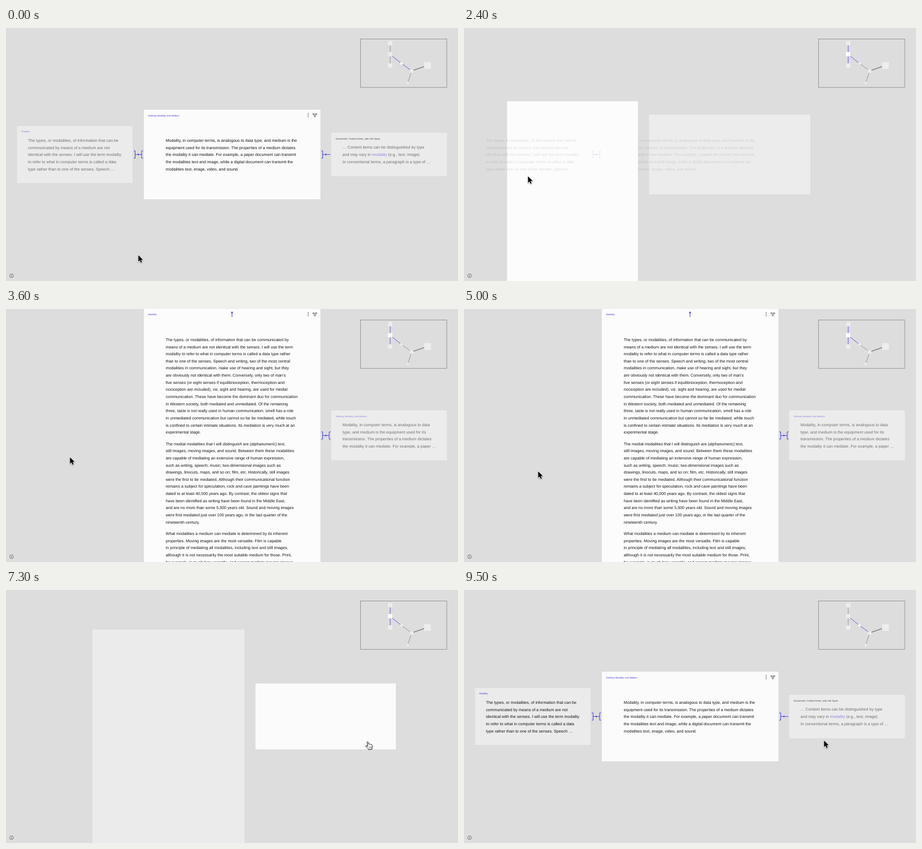
An HTML page with a canvas that plays this animation: 800x449 px, repeating every 9600 ms.

```html
<!DOCTYPE html>
<html lang="en">
<head>
<meta charset="utf-8">
<title>Linked cards</title>
<style>
html, body { margin: 0; width: 100%; height: 100%; overflow: hidden; background: #ddd; }
canvas { display: block; width: 800px; height: 449px; }
</style>
</head>
<body>
<canvas id="stage"></canvas>
<script>
const LOOP = 9600;
const canvas = document.getElementById('stage');
const ctx = canvas.getContext('2d');
const dpr = window.devicePixelRatio || 1;
canvas.width = 800 * dpr;
canvas.height = 449 * dpr;

const BLUE = '#463cdc', INK = '#141414', DIM = 0.57;
const LEADING = 12.64;
const OPEN_AT = 1983, CLOSE_AT = 6812, MOVE = 1050;

const shortText = [
  'The types, or modalities, of information that can be',
  'communicated by means of a medium are not',
  'identical with the senses. I will use the term modality',
  'to refer to what in computer terms is called a data',
  'type rather than to one of the senses. Speech …'];
const centerText = [
  'Modality, in computer terms, is analogous to data type, and medium is the',
  'equipment used for its transmission. The properties of a medium dictates',
  'the modality it can mediate. For example, a paper document can transmit',
  'the modalities text and image, while a digital document can transmit the',
  'modalities text, image, video, and sound.'];
const sideText = [
  'Modality, in computer terms, is analogous to data',
  'type, and medium is the equipment used for its',
  'transmission. The properties of a medium dictates',
  'the modality it can mediate. For example, a paper …'];
const article = [
  ['The types, or modalities, of information that can be communicated by',
   'means of a medium are not identical with the senses. I will use the term',
   'modality to refer to what in computer terms is called a data type rather',
   'than to one of the senses. Speech and writing, two of the most central',
   'modalities in communication, make use of hearing and sight, but they',
   'are obviously not identical with them. Conversely, only two of man’s',
   'five senses (or eight senses if equilibrioception, thermoception and',
   'nociception are included), viz. sight and hearing, are used for medial',
   'communication. These have become the dominant duo for communication',
   'in Western society, both mediated and unmediated. Of the remaining',
   'three, taste is not really used in human communication, smell has a role',
   'in unmediated communication but cannot so far be mediated, while touch',
   'is confined to certain intimate situations. Its mediation is very much at an',
   'experimental stage.'],
  ['The medial modalities that I will distinguish are (alphanumeric) text,',
   'still images, moving images, and sound. Between them these modalities',
   'are capable of mediating an extensive range of human expression,',
   'such as writing, speech; music; two-dimensional images such as',
   'drawings, linocuts, maps, and so on; film, etc. Historically, still images',
   'were the first to be mediated. Although their communicational function',
   'remains a subject for speculation, rock and cave paintings have been',
   'dated to at least 40,000 years ago. By contrast, the oldest signs that',
   'have been identified as writing have been found in the Middle East,',
   'and are no more than some 5,500 years old. Sound and moving images',
   'were first mediated just over 100 years ago, in the last quarter of the',
   'nineteenth century.'],
  ['What modalities a medium can mediate is determined by its inherent',
   'properties. Moving images are the most versatile. Film is capable',
   'in principle of mediating all modalities, including text and still images,',
   'although it is not necessarily the most suitable medium for those. Print,',
   'for example, is much less versatile, and cannot mediate moving images']];

const clamp = v => Math.max(0, Math.min(1, v));
const ramp = (t, from, to) => clamp((t - from) / (to - from));
const lerp = (a, b, k) => a + (b - a) * k;
const smooth = k => k * k * (3 - 2 * k);
const cubic = k => k < 0.5 ? 4 * k ** 3 : 1 - 4 * (1 - k) ** 3;

function withAlpha(alpha, draw) {
  if (alpha <= 0) return;
  ctx.save();
  ctx.globalAlpha = alpha;
  draw();
  ctx.restore();
}

function text(str, x, y, size = 7.13, color = INK) {
  ctx.font = `${size}px "Liberation Sans", Arial, sans-serif`;
  ctx.fillStyle = color;
  ctx.fillText(str, x, y);
}
const title = (str, x, y, color = BLUE) => text(str, x, y, 4.12, color);
const lines = (list, x, y) => list.forEach((s, i) => text(s, x, y + i * LEADING));

function stroke(points, color = BLUE, width = 1) {
  ctx.strokeStyle = color;
  ctx.lineWidth = width;
  ctx.beginPath();
  points.forEach(([x, y]) => ctx.lineTo(x, y));
  ctx.stroke();
}

function fillPath(points, color) {
  ctx.fillStyle = color;
  ctx.beginPath();
  points.forEach(([x, y]) => ctx.lineTo(x, y));
  ctx.closePath();
  ctx.fill();
}

function card([x, y, w, h], gray) {
  const g = Math.round(gray);
  ctx.fillStyle = `rgb(${g},${g},${g})`;
  ctx.fillRect(x, y, w, h);
}

// Left-pointing connector between two cards.
function link(x, rightBracket) {
  const end = rightBracket ? x + 11.5 : x + 13.5;
  stroke([[x - 2.5, 218], [x, 218], [x, 231], [x - 2.5, 231]]);
  if (rightBracket) stroke([[end + 2.5, 218], [end, 218], [end, 231], [end + 2.5, 231]]);
  stroke([[x, 224.5], [end, 224.5]], BLUE, 0.9);
  fillPath([[x + 3.5, 224.5], [x + 6.5, 222.7], [x + 6.5, 226.3]], BLUE);
}

function cardIcons(y) {
  ctx.fillStyle = '#333';
  [-2.8, 0, 2.8].forEach(d => {
    ctx.beginPath();
    ctx.arc(534.8, y + d, 0.75, 0, 7);
    ctx.fill();
  });
  stroke([[544.2, y - 1.7], [549, y - 1.7], [546.6, y + 2.2], [544.2, y - 1.7]], '#444', 0.6);
  [[544.2, -1.7], [549, -1.7], [546.6, 2.2]].forEach(([x, d]) => {
    ctx.beginPath();
    ctx.arc(x, y + d, 1.2, 0, 7);
    ctx.fillStyle = '#fbfbfb';
    ctx.fill();
    ctx.strokeStyle = '#333';
    ctx.lineWidth = 0.7;
    ctx.stroke();
  });
}

function minimap(articleActive) {
  const gray = '#868686', thin = 0.8;
  ctx.strokeStyle = gray;
  ctx.lineWidth = thin;
  ctx.strokeRect(627.5, 19.5, 152.6, 85.8);
  stroke([[680, 27], [680, 66]], articleActive ? BLUE : gray, thin);
  stroke([[680, 47], [700, 63]], BLUE, thin);
  stroke([[700, 63], [718, 76]], articleActive ? gray : BLUE, thin);
  stroke([[718, 76], [746, 66.5]], gray, 1.5);
  stroke([[718, 76], [711, 97.5]], gray, thin);
  const active = articleActive ? 1 : 3;
  [[680, 27, 7.5], [680, 46.5, 7.5], [680, 66.5, 7.5], [700, 63, 4],
   [718, 76.5, 6], [746, 66.5, 12], [711, 97.5, 4]].forEach(([x, y, s], i) => {
    ctx.fillStyle = i === active ? '#fff' : '#ededed';
    ctx.fillRect(x - s / 2, y - s / 2, s, s);
  });
}

function infoIcon() {
  ctx.strokeStyle = '#555';
  ctx.lineWidth = 0.7;
  ctx.beginPath();
  ctx.arc(9.8, 439.6, 3.3, 0, 7);
  ctx.stroke();
  stroke([[9.8, 439.1], [9.8, 441.6]], '#444', 0.8);
  stroke([[9.8, 437.5], [9.8, 438.4]], '#444', 0.8);
}

function arrow(x, y) {
  ctx.save();
  ctx.translate(x + 0.3, y + 0.3);
  ctx.scale(0.95, 0.95);
  ctx.beginPath();
  [[0, 0], [0, 12], [2.8, 9.4], [4.7, 13.8], [6.7, 13], [4.9, 8.7], [8.7, 8.7]]
    .forEach(([a, b]) => ctx.lineTo(a, b));
  ctx.closePath();
  ctx.strokeStyle = '#fff';
  ctx.lineWidth = 1.4;
  ctx.shadowColor = 'rgba(0,0,0,.35)';
  ctx.shadowBlur = 2;
  ctx.shadowOffsetY = 1;
  ctx.stroke();
  ctx.shadowColor = 'transparent';
  ctx.fillStyle = '#000';
  ctx.fill();
  ctx.restore();
}

function hand(x, y) {
  ctx.save();
  ctx.translate(x - 0.5, y + 2.5);
  ctx.lineJoin = 'round';
  const shape = new Path2D('M2.6 1.2C2.2-.3 4.1-.7 4.6.8L5.7 4.4C6.2 3.6 7.3 3.7 7.6 4.5' +
    'C8.2 3.8 9.2 4 9.5 4.9C10.4 4.4 11.3 5 11.5 6L11.8 8.4C11.9 10 11.3 11 11.2 13.2' +
    'L5.2 13.6C4.6 11.6 2.2 10.2.5 8.2C-.1 7 1.2 6.3 2.3 7L3.9 8.1Z');
  ctx.fillStyle = '#fff';
  ctx.fill(shape);
  ctx.strokeStyle = '#111';
  ctx.lineWidth = 1;
  ctx.stroke(shape);
  [6.5, 8.1, 9.7].forEach(a => stroke([[a, 8.6], [a + 0.2, 11]], '#111', 0.6));
  ctx.restore();
}

const pointerPath = [
  [500, 234, 403], [1400, 116, 269], [1700, 113, 263], [4050, 113, 263], [4600, 131, 288],
  [5750, 131, 288], [6300, 625, 272], [6700, 637, 267]];

function pointer(t) {
  let [, x, y] = pointerPath[0];
  for (let i = 1; i < pointerPath.length; i++) {
    const [t0] = pointerPath[i - 1], [t1, x1, y1] = pointerPath[i];
    const k = smooth(ramp(t, t0, t1));
    x = lerp(x, x1, k);
    y = lerp(y, y1, k);
  }
  const overCard = (t >= 1350 && t < 2300) || (t >= 6550 && t < 8400);
  (overCard ? hand : arrow)(x, y);
}

function render(t) {
  const back = t >= 7250;
  const open = back
    ? 1 - cubic(ramp(t, CLOSE_AT, CLOSE_AT + MOVE))
    : cubic(ramp(t, OPEN_AT, OPEN_AT + MOVE));
  const quickFade = 1 - ramp(t, OPEN_AT, OPEN_AT + 300);
  const tint = back ? 0 : 1 - quickFade;
  const overview = back ? ramp(t, 8230, 8500) : 1 - ramp(t, OPEN_AT, 2460);
  const labels = back ? overview : quickFade;
  const reading = back ? 0 : ramp(t, 3540, 3600);
  const thirdCard = back ? ramp(t, 7880, 8050) : quickFade;
  const leftInk = back ? 1 : lerp(DIM, 1, ramp(t, 1250, 1700));
  const rightInk = lerp(DIM, 1, ramp(t, 6500, 7000));
  const between = (a, b) => a.map((v, i) => lerp(v, b[i], open));

  ctx.setTransform(dpr, 0, 0, dpr, 0, 0);
  ctx.textRendering = 'geometricPrecision';
  ctx.fillStyle = '#ddd';
  ctx.fillRect(0, 0, 800, 449);

  withAlpha(thirdCard, () => card([575.5, 186, 205, 77], 235));
  withAlpha(thirdCard * overview * 0.85, () =>
    title('Documents, Content Items, and Link Types', 583.5, 198, '#222'));
  withAlpha(thirdCard * overview * DIM, () => {
    text('… Content items can be distinguished by type', 595.5, 214.4);
    const lead = 'and may vary in ', word = 'modality', y = 214.4 + LEADING;
    text(lead, 595.5, y);
    const wordX = 595.5 + ctx.measureText(lead).width;
    text(word, wordX, y, 7.13, BLUE);
    text(' (e.g., text, image).', wordX + ctx.measureText(word).width, y);
    text('In conventional terms, a paragraph is a type of …', 595.5, y + LEADING);
  });

  card(between([244, 145, 312.5, 159], [575.5, 180, 205, 88.5]), lerp(251, 236, tint));
  withAlpha(overview, () => lines(centerText, 282.7, 202));
  withAlpha(labels, () => {
    title('Defining Modality and Medium', 251.5, 156.5);
    cardIcons(154.6);
  });

  card(between([19.5, 174, 204.5, 101], [244, 0, 312.5, 1100]), lerp(235, 252, tint));
  withAlpha(overview * leftInk, () => lines(shortText, 39, 202));
  withAlpha(labels * leftInk, () => title('Modality', 27, 185.4));
  withAlpha(overview, () => link(228.5, true));
  withAlpha(overview * thirdCard, () => link(560.5, false));

  withAlpha(reading, () => {
    title('Modality', 251.5, 11);
    cardIcons(9.3);
    stroke([[400, 5], [400, 14.5]]);
    fillPath([[400, 4], [398, 7.5], [402, 7.5]], BLUE);
    [56.9, 241.6, 401.1].forEach((y, i) => lines(article[i], 282.7, y));
    link(560.5, true);
  });
  withAlpha(reading * rightInk, () => {
    title('Defining Modality and Medium', 583.5, 191.5);
    lines(sideText, 595.5, 208);
  });

  minimap(t >= 2200 && t < 7350);
  infoIcon();
  pointer(t);
}

const start = performance.now();
function frame() {
  render((performance.now() - start) % LOOP);
  requestAnimationFrame(frame);
}
frame();
</script>
</body>
</html>
```
